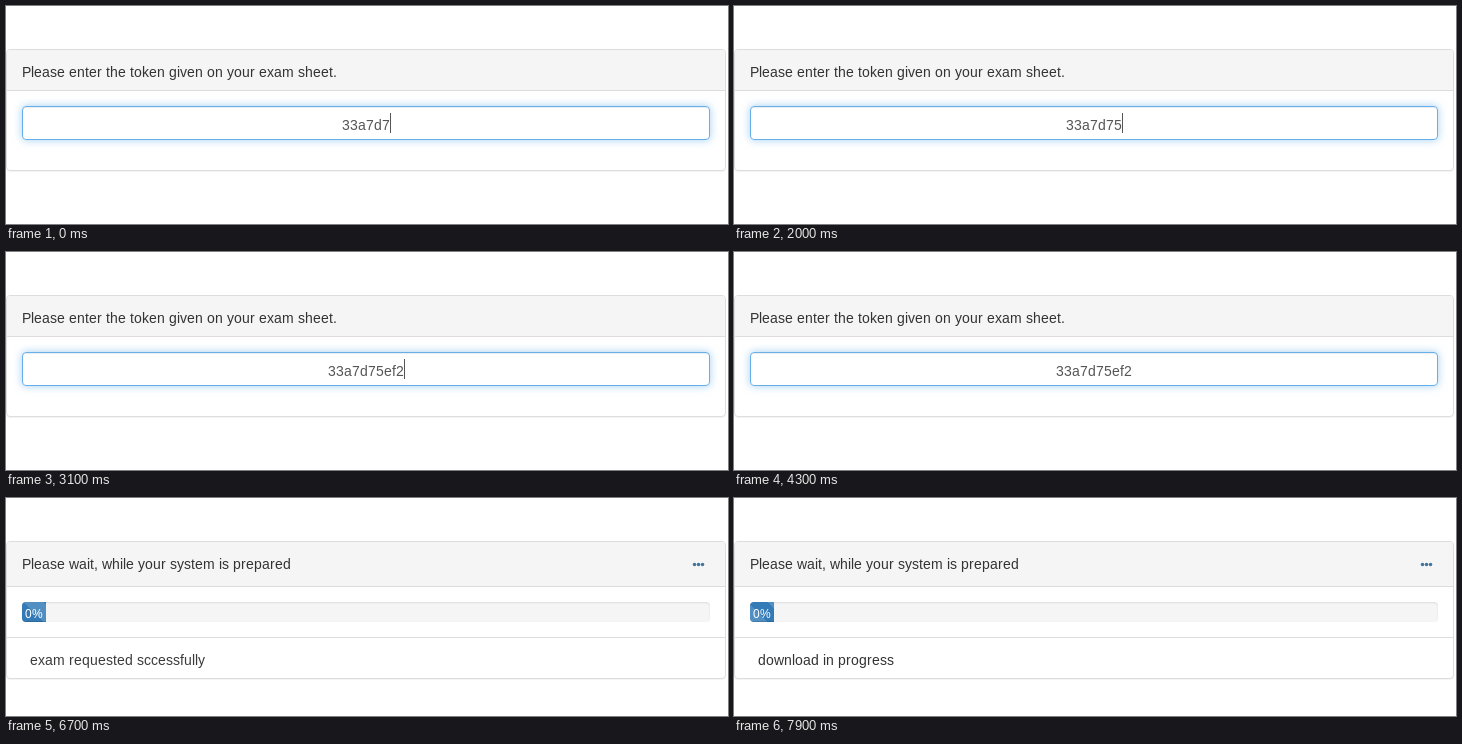
Animation, 722 px wide and 218 px high, one loop 8 s. Source, as an HTML page:

```html
<!DOCTYPE html>
<html lang="en">
<head>
<meta charset="utf-8">
<title>Exam token</title>
<style>
html, body { margin: 0; width: 100%; height: 100%; overflow: hidden; background: #fff; }
#stage { position: relative; width: 722px; height: 218px; overflow: hidden; }
#stage * { position: absolute; box-sizing: border-box; }
.panel { left: 0; top: 43px; width: 720px; border: 1px solid #ddd; border-radius: 4px; box-shadow: 0 1px 1px rgba(0,0,0,.05); }
.head { left: 0; top: 0; width: 718px; background: #f5f5f5; border-bottom: 1px solid #ddd; border-radius: 3px 3px 0 0; }
.rule { left: 0; top: 95px; width: 718px; height: 1px; background: #ddd; }
.field { left: 15px; top: 56px; width: 688px; height: 34px; border: 1px solid #66afe9; border-radius: 4px;
  box-shadow: inset 0 1px 1px rgba(0,0,0,.075), 0 0 8px rgba(102,175,233,.6); }
.track { left: 15px; top: 60px; width: 688px; height: 20px; overflow: hidden; background: #f5f5f5; border-radius: 4px;
  box-shadow: inset 0 1px 2px rgba(0,0,0,.1); }
#bar { left: 0; top: 0; width: 24px; height: 20px; background: #337ab7; box-shadow: inset 0 -1px 0 rgba(0,0,0,.15);
  background-image: linear-gradient(45deg, rgba(255,255,255,.15) 25%, transparent 25%, transparent 50%,
    rgba(255,255,255,.15) 50%, rgba(255,255,255,.15) 75%, transparent 75%, transparent);
  background-size: 40px 40px; }
svg { left: 0; top: 0; }
text { font: 14px "Liberation Sans", Arial, sans-serif; font-kerning: none; fill: #333; }
</style>
</head>
<body>
<div id="stage">
  <div id="entry">
    <div class="panel" style="height:122px">
      <div class="head" style="height:41px"></div>
      <div class="field"></div>
    </div>
    <svg width="722" height="218">
      <text id="ask" y="71"></text>
      <text id="token" y="124" style="fill:#555"></text>
      <rect id="caret" y="107" width="1" height="20" fill="#555"/>
    </svg>
  </div>
  <div id="wait">
    <div class="panel" style="height:138px">
      <div class="head" style="height:45px"></div>
      <div class="track"><div id="bar"></div></div>
      <div class="rule"></div>
    </div>
    <svg width="722" height="218">
      <text id="notice" y="71"></text>
      <g fill="#41749f">
        <circle cx="688.5" cy="66.5" r="1.75"/>
        <circle cx="692.5" cy="66.5" r="1.75"/>
        <circle cx="696.5" cy="66.5" r="1.75"/>
      </g>
      <text id="percent" y="120" style="font-size:12px;fill:#fff"></text>
      <text id="status" y="167"></text>
    </svg>
  </div>
</div>
<script>
const $ = id => document.getElementById(id);
const pen = document.createElement('canvas').getContext('2d');

// Whole-pixel glyph advances, as in hinted text
function advances(str, size) {
  pen.font = `${size}px "Liberation Sans", Arial, sans-serif`;
  return [...str].map(ch => Math.round(pen.measureText(ch).width));
}

function write(id, str, x, size = 14) {
  const el = $(id);
  if (el.textContent === str) return;
  let at = x;
  el.setAttribute('x', advances(str, size).map(w => (at += w) - w).join(' '));
  el.textContent = str;
}

const TOKEN = '33a7d75ef2';
const KEY_TIMES = [2000, 2300, 2700, 3100];
const SWITCH = 4600, MOVE = 6700, SWAP = 7050, FADE = 400;

function drawEntry(t) {
  const str = TOKEN.slice(0, 6 + KEY_TIMES.filter(k => t >= k).length);
  const width = advances(str, 14).reduce((a, b) => a + b, 0);
  write('token', str, 360 - width / 2);
  $('caret').setAttribute('x', 360 + width / 2);
  const hidden = (t >= 900 && t < 2000) || t >= 4300;
  $('caret').style.display = hidden ? 'none' : '';
}

function drawWait(t) {
  const steps = Math.max(0, Math.floor((t - MOVE) / 100) + 1);
  $('bar').style.backgroundPosition = `${4 - 2 * steps}px 0`;
  // The status fades out, changes, and fades in
  const p = Math.min(1, Math.abs(t - SWAP) / FADE);
  write('status', t < SWAP ? 'exam requested sccessfully' : 'download in progress', 24);
  $('status').style.opacity = 0.5 - Math.cos(Math.PI * p) / 2;
}

function draw(time) {
  const t = Math.floor(time % 8000 / 100) * 100;
  const waiting = t >= SWITCH;
  $('entry').style.display = waiting ? 'none' : '';
  $('wait').style.display = waiting ? '' : 'none';
  (waiting ? drawWait : drawEntry)(t);
}

write('ask', 'Please enter the token given on your exam sheet.', 16);
write('notice', 'Please wait, while your system is prepared', 16);
write('percent', '0%', 19, 12);

const start = performance.now();
function tick() {
  draw(performance.now() - start);
  requestAnimationFrame(tick);
}
tick();
</script>
</body>
</html>
```
